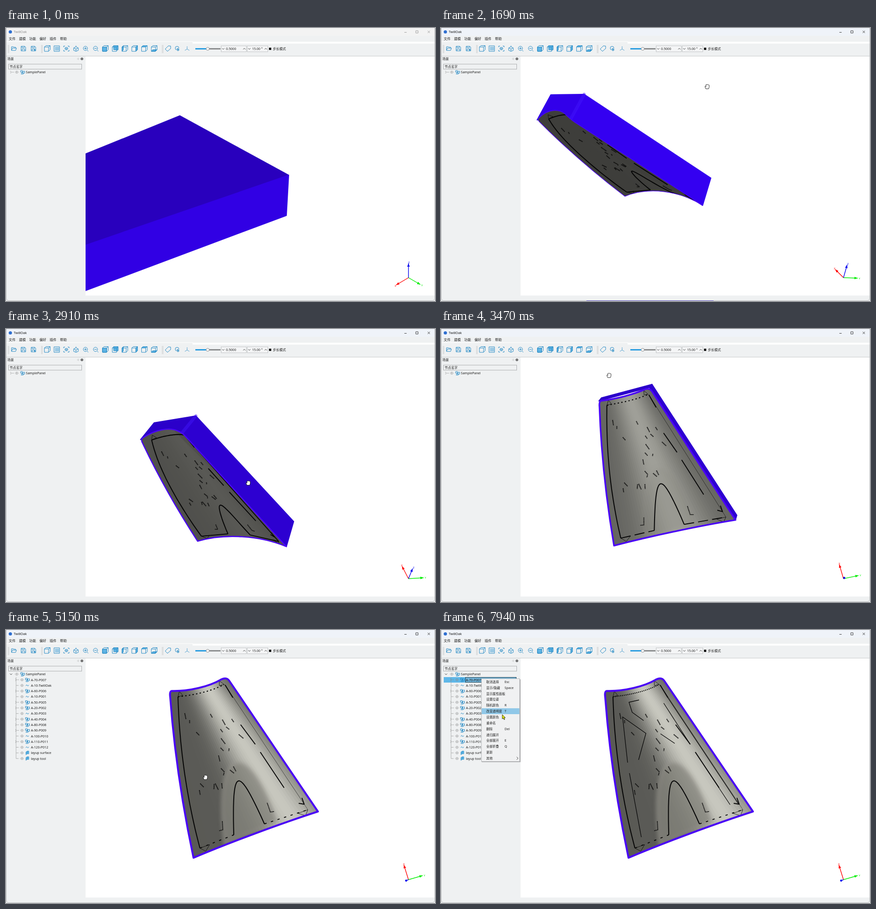
These frames come from a looping animation (938x597 px, 7.99 s). An HTML page:

```html
<!DOCTYPE html>
<html lang="zh">
<head>
<meta charset="utf-8">
<style>
html,body{margin:0;width:100%;height:100%;overflow:hidden;background:#eff1f2}
svg{display:block;width:938px;height:597px;font:7.1px "Noto Sans","Noto Sans CJK SC","Noto Sans CJK",sans-serif}
text{fill:#1c1c1c}
.ic{fill:none;stroke:#2489c4;stroke-width:1}
.ln{fill:none;stroke:#060606;stroke-linejoin:round}
</style>
</head>
<body>
<svg viewBox="0 0 938 597">
<defs>
<clipPath id="view"><rect x="174" y="62" width="763" height="523"/></clipPath>
<clipPath id="face"><path id="facePath"/></clipPath>
<filter id="soft" x="-30%" y="-30%" width="160%" height="160%"><feGaussianBlur stdDeviation="4"/></filter>
</defs>
<g id="chrome"></g>
<g id="scene" clip-path="url(#view)"></g>
<g id="triad"></g>
<g id="overlay"></g>
</svg>
<script>
const LOOP = 7990;
const $ = id => document.getElementById(id);
const lerp = (a, b, k) => a + (b - a) * k;
const mix = (a, b, k) => a.map((v, i) => lerp(v, b[i], k));
const add = (a, b, k = 1) => a.map((v, i) => v + b[i] * k);
const clamp = v => Math.max(0, Math.min(1, v));
const progress = (t, from, to) => clamp((t - from) / (to - from));
const points = s => s.split(' ').map(p => p.split(',').map(Number));
const rect = (x, y, w, h, fill, extra = '') => `<rect x="${x}" y="${y}" width="${w}" height="${h}" fill="${fill}" ${extra}/>`;
const path = (d, extra = '') => `<path d="${d}" ${extra}/>`;
const label = (x, y, s, extra = '') => `<text x="${x}" y="${y}" ${extra}>${s}</text>`;
const icon = (x, y, d, extra = '') => path(d, `class="ic" transform="translate(${x} ${y})" ${extra}`);
const poly = p => 'M' + p.map(q => q[0].toFixed(1) + ' ' + q[1].toFixed(1)).join('L');

// Bezier curve of any order, sampled
function curve(ctrl, n = 24) {
  const at = (p, k) => p.length < 2 ? p[0] : at(p.slice(1).map((b, i) => mix(p[i], b, k)), k);
  return Array.from({length: n + 1}, (_, i) => at(ctrl, i / n));
}
function seeded(seed) {
  return () => (seed = seed * 16807 % 2147483647) / 2147483647;
}

// ---------- window ----------
const CUBE = 'M-6-3.5H3V6H-6ZM-6-3.5L-3-6.5H6.5L3-3.5M6.5-6.5V2.5L3 6';
const SIDES = ['M-6-3.5H3V6H-6Z', 'M-3-6.5H6.5V2.5H-3Z', 'M-6-3.5L-3-6.5V2.5L-6 6Z',
  'M3-3.5L6.5-6.5V2.5L3 6Z', 'M-6-3.5L-3-6.5H6.5L3-3.5Z', 'M-6 6L-3 2.5H6.5L3 6Z'];
const chevron = (x, y, d = 1) => path(`M${x - 2.5} ${y - 1.3 * d}l2.5 ${2.6 * d}l2.5 ${-2.6 * d}`, 'fill="none" stroke="#333" stroke-width=".9"');
const grip = x => rect(x, 37, 1, 18, '#cfd1d2') + rect(x + 2, 37, 1, 18, '#cfd1d2');

function windowFrame(active) {
  const ink = active ? '#111' : '#8a8a8a', y = 45;
  let s = rect(0, 0, 938, 597, '#eff1f2') + rect(0, 0, 938, 17, active ? '#eff3f9' : '#f3f3f3') +
    rect(1, 29, 408, 1.5, '#fbfbfb') + rect(408, 30, 529, 4, '#fff') +
    rect(1, 61, 937, 1, '#c9cbcc') + rect(174, 62, 763, 523, '#fff') +
    `<circle cx="9.5" cy="8.5" r="3.6" fill="#2f6fd0"/>` +
    label(17, 11, 'TwillOak', `style="fill:${ink}"`) +
    path('M871 9.5h5M896 6h5v5h-5zM922 6l5 5m0-5l-5 5', `fill="none" stroke="${ink}" stroke-width=".8"`);
  ['文件', '建模', '功能', '偏好', '插件', '帮助'].forEach((m, i) => s += label(6 + i * 22.4, 26, m, 'font-size="7.4"'));
  s += grip(4) + grip(77) + grip(341);
  s += icon(17, y, 'M-5 4V-4H-1L0-3H4V-1M-5 4L-3-1H6L4 4Z') +
    [38, 60].map(x => icon(x, y, 'M-5-5H3L5-3V5H-5ZM-3-5V-2H2V-5M-3 5V1H3V5')).join('') +
    path('M61 45l4 3.5-2 .3-1 2z', 'fill="#2489c4"') + icon(90, y, CUBE) +
    icon(111, y, 'M-6-6H6V6H-6Z') + rect(107, 41, 9, 8, '#9bc9e4') +
    icon(132, y, 'M-6-3V-5.5H-3M3-5.5H6V-3M6 3V5.5H3M-3 5.5H-6V3M0-3L3-1.5V1.5L0 3L-3 1.5V-1.5ZM-3-1.5L0 0L3-1.5M0 0V3') +
    icon(153, y, 'M0-4L5-1.5V4L0 6L-5 4V-1.5ZM-5-1.5L0 1L5-1.5M0 1V6M0-6.5V-4') +
    [174, 196].map((x, i) => icon(x, y, 'M3.5 3.5L6 6M-5-.5a4.6 4.6 0 1 0 9.2 0a4.6 4.6 0 1 0-9.2 0M-3-.5H2.5' + (i ? '' : 'M-.3-3V2'))).join('');
  SIDES.forEach((d, i) => s += icon(217 + i * 21.35, y, d, 'style="fill:#5fb4e4"') + icon(217 + i * 21.35, y, CUBE));
  s += icon(354, y, 'M-6 1L1-6L6-5.5V0L-1 6Z') +
    icon(375, y, 'M-5-1a4 4 0 1 0 8 0a4 4 0 1 0-8 0M-1-1l5 4-2 .3-1 2z') +
    icon(396, y, 'M0-5V1L-5 4M0 1L5 4', 'stroke-opacity=".75"');
  s += rect(414, 44, 27, 3, '#2a9de0') + rect(441, 44, 28, 3, '#8b8d8e') +
    '<circle cx="441" cy="45.5" r="3.3" fill="#fff" stroke="#777" stroke-width=".8"/>';
  [[470, 56, '0.5000'], [527, 46, '15.00 °']].forEach(([x, w, v]) =>
    s += rect(x + .5, 39, w - 1, 13, '#f4f5f6', 'stroke="#b4b7b9" stroke-width=".8"') +
      label(x + 11, 48, v) + chevron(x + 5, 45.5) + chevron(x + w - 5, 45.5, -1));
  s += rect(575, 43, 5, 5, '#111') + label(583.5, 48, '步长模式');
  s += label(3, 70, '场景') + path('M156 67.5l2-2 2 2-2 2z', 'fill="none" stroke="#aaa" stroke-width=".7"') +
    '<circle cx="166" cy="67.5" r="2.8" fill="#555"/>' + path('M165 66.5l2 2m0-2l-2 2', 'stroke="#fff" stroke-width=".7"') +
    rect(5.5, 79, 160, 11, '#eff1f2', 'stroke="#a2a5a7" stroke-width=".9"') + label(8, 87, '节点名字');
  return s + path('M.5 0V590Q.5 596.5 7 596.5H931Q937.5 596.5 937.5 590V0', 'fill="none" stroke="#b9bbbc"');
}

// ---------- tree and menu ----------
const ROW = 12.3, rowY = i => 96.6 + i * ROW;
const NODES = ['70-P007', '10-TwillOak', '60-P006', '10-P001', '50-P005', '20-P002', '30-P003', '40-P004',
  '80-P008', '90-P009', '100-P010', '110-P011', '120-P012'].map(n => 'A-' + n).concat('layup surface', 'layup tool');
const isLeaf = name => /TwillOak|P001|P003|P010|P012/.test(name);
const eye = (x, y) => path(`M${x - 3.7} ${y}q3.7-5 7.4 0q-3.7 5-7.4 0z`, 'fill="none" stroke="#888" stroke-width=".7"') +
  `<circle cx="${x}" cy="${y}" r="1" fill="#888"/>`;
const group = (x, y) => icon(x, y, 'M-4-3.5H0V0H-4ZM1-2H5V2H1ZM-3 4L-.5 0L2 4Z', 'stroke-width=".9"');
const arm = (x, y) => path(`M${x - 1.5} ${y - 2.5}l2.5 2.5l-2.5 2.5M${x + 3} ${y}h2.5`, 'fill="none" stroke="#777" stroke-width=".8"');

function tree(open, hover, selected) {
  let s = '';
  if (hover >= 0) s += rect(6, rowY(hover) - 6, 159.5, ROW, '#add9ec');
  if (selected) s += rect(6, 103, 47, 12, '#5fb7e8') + rect(53.5, 103.5, 111, 11, '#70b1d6', 'stroke="#20414f"');
  s += (open ? chevron(11, rowY(0)) : arm(11, rowY(0))) + eye(23.5, rowY(0)) + group(36, rowY(0)) + label(43.5, 99.2, 'SamplePanel');
  if (!open) return s;
  s += path(`M22 103V${rowY(15)}`, 'stroke="#999" stroke-width=".7"');
  NODES.forEach((name, i) => {
    const y = rowY(i + 1), layup = name.startsWith('layup'), leaf = isLeaf(name);
    s += leaf || layup ? path(`M22 ${y}h5.5`, 'stroke="#999" stroke-width=".8"') : arm(22, y);
    s += eye(35, y) + label(54.5, y + 2.6, name);
    s += layup ? path(`M43.5 ${y - 2}l3-2v6l-3 2zm3-2h3.5v6h-3.5`, 'fill="#5fb4e4" stroke="#2489c4" stroke-width=".7"')
      : leaf ? icon(46.5, y, 'M-3 1Q-1.5-3 0 0T3-1', 'stroke-width=".8"') : group(46.5, y);
  });
  return s;
}

const ITEMS = ['取消选择 Esc', '显示/隐藏 Space', '显示属性面板', '设置位姿', '随机颜色 R', '改变透明度 T', '设置颜色',
  '重命名', '删除 Del', '递归展开', '全部展开 E', '全部折叠 Q', '更新', '其他'];
function menu(y) {
  const step = 12.85, hot = Math.floor((y - 109) / step);
  let s = rect(89, 108, 85, 181, '#000', 'opacity=".28"') + rect(88.5, 106.5, 83.5, 181, '#f0f1f2', 'stroke="#a9abad" stroke-width=".8"');
  ITEMS.forEach((item, i) => {
    const [name, key = ''] = item.split(' '), cy = 113.3 + i * step;
    if (i === hot) s += rect(89, cy - 6.4, 82.5, step, '#90c8e8');
    s += label(99, cy + 2.6, name, 'font-size="6.9"') + label(139, cy + 2.6, key);
  });
  return s + path('M165.5 277.5l3 3-3 3', 'fill="none" stroke="#333"');
}

// ---------- block ----------
// shape: lower corners A B C D, lift of the near and far upper edges, hollow of the near and far lower edges
const POSES = [
  {shape: '375,280 613,410 148,584 30,434 5,-88 -6,-98 0,0 0,0', axes: '-27,16 26,15 0,-31', tone: [62, 0, 228]},
  {shape: '402,368 572,388 283,200 210,201 18,-60 30,-55 0,-27 0,-25', axes: '-18,-18 31,1 8,-28', tone: [62, 3, 242]},
  {shape: '419,464 613,476 385,227 294,242 16,-55 30,-37 0,-21 0,-17', axes: '-14,-27 33,-2 9,-22', tone: [80, 9, 209]},
  {shape: '369,476 651,404 472,105 357,138 0,0 0,0 0,0 0,11', axes: '-8,-32 33,-8 0,3', tone: [104, 72, 209]},
  {shape: '410,498 682,397 482,102 357,133 0,0 0,0 0,-4 0,12', axes: '-10,-32 31,-9 -5,2', tone: [90, 108, 209]}
].map(p => ({shape: points(p.shape), axes: points(p.axes), tone: p.tone}));
const REST = POSES[4].shape;
const TURNS = [[1150, 1690], [1690, 2910], [2910, 3600], [4650, 4920]];
const WHEEL = [540, 600, 670, 920, 970];

function poseAt(t) {
  const p = TURNS.reduce((sum, turn) => sum + progress(t, ...turn), 0);
  const i = Math.min(3, Math.floor(p)), k = p - i, a = POSES[i], b = POSES[i + 1];
  const zoom = .917 ** WHEEL.filter(tick => t >= tick).length, pivot = [520, 350];
  const zoomed = i ? a.shape : a.shape.map((q, n) => n < 4 ? mix(pivot, q, zoom) : q.map(v => v * zoom));
  return {p, shape: zoomed.map((q, n) => mix(q, b.shape[n], k)),
    axes: a.axes.map((q, n) => mix(q, b.axes[n], k)), tone: mix(a.tone, b.tone, k)};
}

// surface details are drawn in the last pose and carried to the others as u, v
function toUV([x, y]) {
  const [A, B, C, D] = REST;
  let u = .5, v = .5;
  for (let i = 0; i < 14; i++) {
    const left = mix(A, D, v), right = mix(B, C, v), low = mix(A, B, u), high = mix(D, C, u);
    u = (x - left[0]) / (right[0] - left[0]);
    v = (y - low[1]) / (high[1] - low[1]);
  }
  return [u, v];
}
const strokes = (...list) => list.map(s => points(s).map(toUV));
const bend = s => curve(points(s)).map(toUV);
const BORDER = [bend('376,146 381,315 424,477'), bend('498,448 494,300 505,290 565,424')];
const RAIL = strokes('479,120 496,148', '513,207 545,250', '556,267 608,345', '640,379 652,381 647,367');
const TOP = [bend('376,146 440,139 477,119')];
const BASE = strokes('424,477 498,448', '565,424 660,393');
const OUTER = strokes('479,120 660,393');
const PICKED = strokes('433,153 411,158 418,180 443,198', '408,290 397,190 448,226 432,284', '412,313 438,453',
  '480,227 511,248', '487,160 545,250', '496,148 650,380', '556,267 632,382');
const HOOKS = strokes('473,418 474,437 466,439', '571,378 578,398 586,397');
const VALLEY = bend('478,470 450,250 530,230 592,418');
const CORNERS = strokes('376,146', '477,119', '660,393', '424,477').map(([[u, v]]) => {
  const du = u < .5 ? .08 : -.08, dv = v < .5 ? -.03 : .03;
  return [[u, v], [u + du / 2, v + dv], [u + du, v], [u, v]];
});
const random = seeded(23);
const MARKS = Array.from({length: 22}, (_, i) => {
  const u = .15 + .6 * random(), v = .36 + .55 * random(), lean = random() * .05 - .02;
  return [[u, v], [u + lean, v - .012 - .03 * random()]];
});

const FACES = [[0, 1, 2, 3, .83], [1, 5, 6, 2, 1], [2, 6, 7, 3, .97], [0, 4, 5, 1, .9], [3, 7, 4, 0, .9]];
const area = p => p.reduce((s, a, i) => { const b = p[(i + 1) % p.length]; return s + a[0] * b[1] - b[0] * a[1]; }, 0);

function block({p, shape, tone: [base, glow, blue]}, picked) {
  const [A, B, C, D, liftNear, liftFar, near, far] = shape;
  const corners = [add(A, liftNear), add(B, liftNear), add(C, liftFar), add(D, liftFar), A, B, C, D];
  let s = '';
  for (const [a, b, c, d, shade] of FACES) {
    const q = [a, b, c, d].map(n => corners[n]);
    if (area(q) < 1) continue;
    const l = blue * shade, fill = `rgb(${l * .217 | 0},0,${l | 0})`;
    s += path(poly(q) + 'Z', `fill="${fill}" stroke="${fill}" stroke-width="2" stroke-linejoin="round"`);
  }
  if (p > .3 && p < 2.8) s += path(poly([corners[2], C]), 'stroke="#4518ff" stroke-width="7" stroke-linecap="round" opacity=".45"');
  if (area([D, C, B, A]) <= 0) return s;

  const at = ([u, v]) => {
    const arch = 4 * u * (1 - u), q = mix(mix(A, B, u), mix(D, C, u), v);
    const sink = .5 * lerp(liftNear[0], liftFar[0], v);
    const rise = .75 * (near[1] - REST[6][1]) * (1 - v) ** 4 + .75 * (far[1] - REST[7][1]) * v ** 4;
    return add(q, [sink, rise], arch);
  };
  const edge = (from, to, k, hollow) => add(mix(from, to, k), hollow);
  const bow = add(mix(D, A, .5), [D[1] - A[1], A[0] - D[0]], .032);
  const d = `M${A}C${edge(A, B, .3, near)} ${edge(A, B, .7, near)} ${B}L${mix(C, B, .03)}Q${C} ${edge(C, D, .1, far.map(v => v * .3))}` +
    `C${edge(C, D, .3, far)} ${edge(C, D, .65, far)} ${edge(C, D, .95, far.map(v => v * .15))}Q${D} ${mix(D, A, .04)}Q${bow} ${A}Z`;
  $('facePath').setAttribute('d', d);

  const late = clamp(p - 3), centre = .52 + .15 * late, width = .28 - .04 * late, tilt = .2 * late;
  const gray = u => {
    const l = base + glow * Math.exp(-(((u - centre) / width) ** 2)) + 22 * late * clamp(u - .6);
    return `rgb(${l | 0},${l | 0},${l * .955 | 0})`;
  };
  s += path(d, `fill="${gray(0)}"`) + '<g clip-path="url(#face)">';
  const N = 44;
  for (let n = -6; n < N + 6; n++) {
    const u = n / N, w = 1.4 / N, low = tilt * .58, high = -tilt * .58;
    s += path(poly([[u + low, -.08], [u + w + low, -.08], [u + w + high, 1.08], [u + high, 1.08]].map(at)) + 'Z', `fill="${gray(u)}"`);
  }
  s += path(poly(VALLEY.map(at)) + 'Z', `fill="#85847d" stroke="#a09f97" stroke-width="3" filter="url(#soft)" opacity="${.25 * clamp(p - 2) + .5 * late}"`);

  const ink = (set, w, dash = 'none') => set.forEach(l => s += path(poly(l.map(at)), `class="ln" stroke-width="${w}" stroke-dasharray="${dash}"`));
  const tilted = p < 2.6;
  ink(BORDER, 2.1);
  ink(RAIL, 2);
  ink(OUTER, tilted ? 1.8 : .6);
  ink(TOP, 2.2, tilted ? 'none' : picked ? '2 2' : '3 5');
  ink(BASE, 1.9, tilted ? 'none' : p < 3.5 ? '22 9' : '5 10');
  ink(CORNERS, .8);
  ink(MARKS, 2.1, '1.6 .7');
  ink(HOOKS, 1.8, '1.6 .7');
  if (picked) ink(PICKED, 1.3);
  return s + '</g>' + path(d, `fill="none" stroke="#4a06f5" stroke-width="${Math.min(4.2, 1.3 * p)}" stroke-linejoin="round"`);
}

// ---------- axes ----------
function triad(axes) {
  return axes.map(([x, y], n) => {
    const c = ['#f00', '#0e0', '#00e'][n], r = Math.hypot(x, y) || 1, ux = x / r, uy = y / r, X = 880 + x, Y = 546 + y;
    const s = path(`M880 546L${X} ${Y}`, `stroke="${c}" stroke-width="1.4"`);
    if (r < 9) return s + `<circle cx="${X}" cy="${Y}" r="2.3" fill="${c}"/>`;
    const wing = side => [X - ux * 7 - uy * side, Y - uy * 7 + ux * side];
    return s + path(poly([[X, Y], wing(2.8), wing(-2.8)]) + 'Z', `fill="${c}"`) +
      label(X + ux * 3 + 1, Y + uy * 3 + 2.5, 'XYZ'[n], `text-anchor="middle" font-size="6" style="fill:${c}"`);
  }).join('');
}

// ---------- pointer: start, end, target ----------
const MOVES = [[100, 390, 512, 345], [1150, 1690, 582, 128], [1970, 2750, 530, 337], [2910, 3600, 330, 47], [3600, 4150, 11, 97],
  [4430, 4650, 470, 345], [4650, 4920, 436, 322], [5290, 5850, 86, 107], [7620, 7920, 134, 185]];
const pointerAt = t => MOVES.reduce((pos, [from, to, ...target]) => mix(pos, target, progress(t, from, to)), [660, 586]);
function pointer(t, [x, y]) {
  if (t < 100) return '';
  if (t >= 1150 && x > 174 && y > 62)
    return path(`M${x - 3} ${y + 5}L${x - 5} ${y}l1.3-.6 1 1v-4.4q1-1.2 1.7 0q.9-1.4 1.9 0q1-1 1.8.4q1.1-.6 1.6.7v4.4l-1.3 3.5z`, 'fill="#fff" stroke="#111" stroke-width=".9"');
  return path(`M${x} ${y}v9.5l2.2-2 1.7 3.7 1.6-.8-1.7-3.5h3z`, 'fill="#e6f000" stroke="#111" stroke-width=".8"');
}

let wasActive;
function draw(t) {
  const active = t >= 1150, open = t >= 4400, picked = t >= 6130;
  const pose = poseAt(t), pos = pointerAt(t), row = Math.floor((pos[1] - 90) / ROW);
  if (active !== wasActive) $('chrome').innerHTML = windowFrame(wasActive = active);
  $('scene').innerHTML = block(pose, picked);
  $('triad').innerHTML = triad(pose.axes);
  const hover = !picked && pos[0] < 165 && row >= 0 && row < (open ? 16 : 1) ? row : -1;
  $('overlay').innerHTML = tree(open, hover, picked) +
    (active && t < 1970 ? rect(318, 596, 278, 1, '#4a3fb0') : '') +
    (t >= 7600 ? menu(pos[1]) : '') + pointer(t, pos);
}
const start = performance.now();
function tick() {
  draw((performance.now() - start) % LOOP);
  requestAnimationFrame(tick);
}
tick();
</script>
</body>
</html>
```
